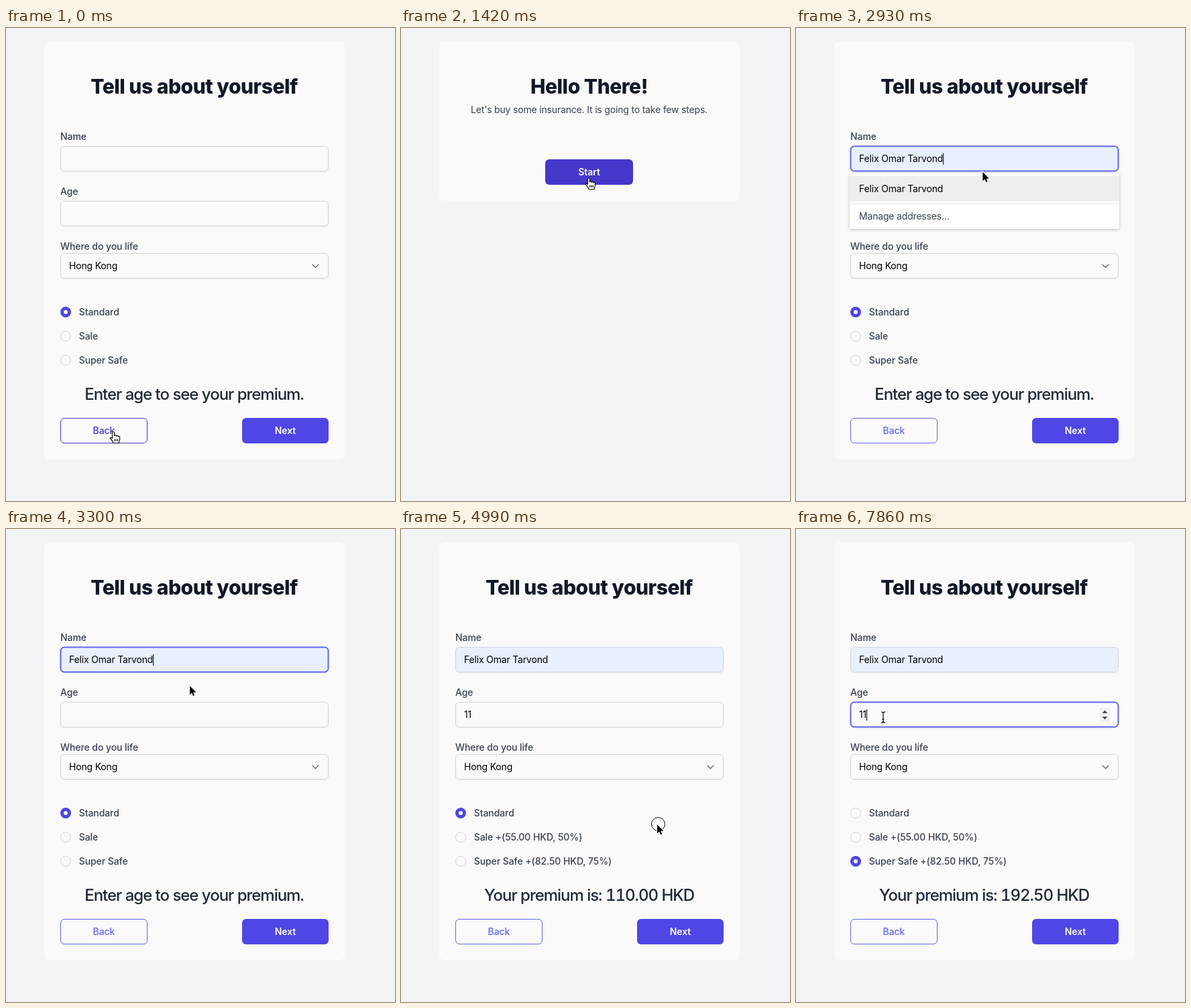
An HTML page that plays this animation: 580x706 px, repeating every 8 s.

```html
<!DOCTYPE html>
<html lang="en">
<head>
<meta charset="utf-8">
<title>Insurance form</title>
<style>
html, body { margin: 0; width: 100%; height: 100%; overflow: hidden; background: #f3f4f6; }
svg { display: block; width: 580px; height: 706px; }
text { font: 500 14px Inter, sans-serif; font-optical-sizing: none; letter-spacing: -.07px; fill: #374151; white-space: pre; }
.title { font-size: 30px; font-weight: 800; letter-spacing: -.47px; fill: #111827; }
.big { font-size: 24px; letter-spacing: -1.03px; font-variant-numeric: tabular-nums; fill: #1f2937; }
.mid { text-anchor: middle; }
.val, .note { font-weight: 400; letter-spacing: -.18px; }
.val { fill: #000; }
.solid { font-weight: 600; fill: #fff; }
.card { x: 57px; y: 20px; width: 448px; rx: 8px; fill: #fafafa; }
.field { x: 81.5px; width: 399px; height: 37px; rx: 5.5px; fill: #fafafa; stroke: #d1d5db; filter: drop-shadow(0 1px 1px rgba(0,0,0,.06)); }
.field.filled { fill: #e8f0fe; }
.field.focus { stroke: #6366f1; stroke-width: 2px; }
.caret { width: 1px; height: 17px; }
.primary { height: 38px; rx: 6px; fill: #4f46e5; }
.primary.hover { fill: #4338ca; }
#back { fill: #6366f1; }
#back.hover { fill: #4338ca; }
#back rect { fill: none; stroke: #6366f1; }
#back.hover rect { stroke: #4338ca; }
#back text { fill: inherit; }
.ring { fill: none; stroke: #6366f1; stroke-width: 2px; }
#menu { filter: drop-shadow(0 1px 2px rgba(0,0,0,.25)); }
</style>
</head>
<body>
<svg viewBox="0 0 580 706">
  <g id="hello">
    <rect class="card" height="238"/>
    <text class="title mid" x="280.5" y="97.5">Hello There!</text>
    <text class="note mid" x="280.5" y="127">Let's buy some insurance. It is going to take few steps.</text>
    <rect id="start" class="primary" x="215" y="196" width="131"/>
    <text class="solid mid" x="280.5" y="220">Start</text>
  </g>
  <g id="form">
    <rect class="card" height="624"/>
    <text class="title mid" x="280.5" y="97.5">Tell us about yourself</text>

    <text x="81" y="167">Name</text>
    <rect id="nameBox" class="field" y="176.5"/>
    <text id="name" class="val" x="94" y="200"></text>
    <rect id="nameCaret" class="caret" y="187"/>

    <text x="81" y="249">Age</text>
    <rect id="ageBox" class="field" y="258.5"/>
    <text id="age" class="val" x="94" y="282"></text>
    <rect id="ageCaret" class="caret" y="269"/>
    <g id="spinner" transform="translate(460.5 277.5)">
      <rect x="-7.5" y="-10.5" width="15" height="21" fill="#f1f1f1"/>
      <path d="M-4 -2.5 L0 -7 L4 -2.5 Z M-4 2.5 L0 7 L4 2.5 Z" fill="#4b4b4b"/>
    </g>

    <text x="81" y="331">Where do you life</text>
    <rect class="field" y="336.5"/>
    <text class="val" x="94" y="360">Hong Kong</text>
    <path d="M457 353 l4.5 4.5 l4.5 -4.5" fill="none" stroke="#6b7280" stroke-width="1.4" stroke-linecap="round"/>

    <g id="radios"></g>
    <text id="premium" class="big mid" x="280.5" y="555"></text>
    <g id="back">
      <rect x="81.5" y="582.5" width="129" height="37" rx="5.5"/>
      <text class="mid" x="146" y="606">Back</text>
    </g>
    <rect id="backRing" class="ring" x="78" y="579" width="136" height="44" rx="9"/>
    <rect class="primary" x="352" y="582" width="129"/>
    <text class="solid mid" x="416.5" y="606">Next</text>

    <g id="menu">
      <rect x="80" y="217" width="402" height="83" rx="3" fill="#fff"/>
      <rect id="menuRow" x="80" y="221" width="402" height="38" fill="#eee"/>
      <text id="menuName" class="val" x="94" y="245"></text>
      <path d="M80 262.5 H482" stroke="#e5e7eb"/>
      <text class="note" x="94" y="286">Manage addresses…</text>
    </g>
  </g>
  <g id="cursor">
    <circle id="press" cx="1.5" cy="-.5" r="10" fill="none" stroke="#000"/>
    <path id="arrow" d="M0 0 V13.5 L3 10.6 L5 15.2 L7.2 14.2 L5.2 9.8 H9.4 Z" stroke="#fff" stroke-width="1.8" paint-order="stroke"/>
    <g id="beam" fill="none">
      <path id="bar" d="M-3 -8 Q0 -8 0 -6 V6 Q0 8 -3 8 M3 -8 Q0 -8 0 -6 M0 6 Q0 8 3 8 M-1.6 3 H1.6"/>
      <use href="#bar" stroke="#fff" stroke-width="2.4"/>
      <use href="#bar" stroke="#000" stroke-width="1.2"/>
    </g>
    <g id="hand" stroke="#000" stroke-width="1.1" stroke-linejoin="round">
      <path fill="#fff" d="M-1.5 9.5 V1 a1.5 1.5 0 0 1 3 0 V6 a1.5 1.5 0 0 1 3 .4 a1.4 1.4 0 0 1 2.8 .6 a1.2 1.2 0 0 1 2.3 1 V11.5 Q8.3 14 8.3 16.5 H0 Q-.3 14 -4.7 9.5 Q-4.5 6.5 -1.5 9.5 Z"/>
      <path d="M1.8 10.4 v3.4 m2.3 0 v-3.4 m2.3 0 v3.4"/>
    </g>
  </g>
</svg>
<script>
const LOOP = 8000;
const NAME = 'Felix Omar Tarvond';
const RATE = 10;
const plans = [['Standard', 0], ['Sale', 50], ['Super Safe', 75]];

const when = {
  pressBack: 180, hello: 260, form: 1990,
  focusName: 2630, menu: 2690, preview: 2930, pick: 3200,
  focusAge: 3780, one: 4100, eleven: 4340, blur: 4990,
  sale: 5960, superSafe: 6820, refocus: 7800
};

// each move starts where the last one ended; bend bows it sideways
const home = { x: 160, y: 603 };
const moves = [
  { from: 470, to: 610, x: 347, y: 214, bend: .62 },
  { from: 780, to: 1460, x: 280, y: 226, bend: 3.9 },
  { from: 2220, to: 2360, x: 280, y: 208 },
  { from: 2870, to: 3300, x: 274, y: 234 },
  { from: 3360, to: 3540, x: 278, y: 277 },
  { from: 4430, to: 4810, x: 382, y: 441 },
  { from: 5060, to: 5550, x: 86, y: 457 },
  { from: 6000, to: 6340, x: 86, y: 490 },
  { from: 6880, to: 7570, x: 130, y: 281 }
];

const $ = id => document.getElementById(id);
const show = (el, on) => { el.style.display = on ? '' : 'none'; };
const mark = (id, cls, on) => $(id).classList.toggle(cls, on);
const put = (el, text) => { if (el.textContent !== text) el.textContent = text; };
const within = (t, a, b) => t >= a && t < b;
const easeOut = k => 1 - (1 - k) ** 2;

function pointer(t) {
  let { x, y } = home;
  for (const m of moves) {
    if (t < m.from) break;
    const k = easeOut(Math.min(1, (t - m.from) / (m.to - m.from)));
    const dx = m.x - x, dy = m.y - y;
    const bow = 2 * k * (1 - k) * (m.bend || 0);
    x += dx * k - dy * bow;
    y += dy * k + dx * bow;
  }
  return [x, y];
}

function add(tag, attrs) {
  const el = document.createElementNS('http://www.w3.org/2000/svg', tag);
  for (const key in attrs) el.setAttribute(key, attrs[key]);
  return $('radios').appendChild(el);
}

const radios = plans.map((_, i) => {
  const cx = 89, cy = 424 + 36 * i;
  return {
    ring: add('circle', { class: 'ring', cx, cy, r: 11 }),
    off: add('circle', { cx, cy, r: 7.5, fill: '#fafafa', stroke: '#d1d5db' }),
    on: add('circle', { cx, cy, r: 5.5, fill: '#fff', stroke: '#4f46e5', 'stroke-width': 5 }),
    label: add('text', { x: 108.7, y: cy + 5 })
  };
});
put($('menuName'), NAME);

function drawPlans(age, chosen, ringed) {
  const base = age * RATE;
  plans.forEach(([title, pct], i) => {
    const r = radios[i];
    const extra = age && pct ? ` +(${(base * pct / 100).toFixed(2)} HKD, ${pct}%)` : '';
    put(r.label, title + extra);
    show(r.ring, ringed && i === chosen);
    show(r.on, i === chosen);
    show(r.off, i !== chosen);
  });
  const total = base * (1 + plans[chosen][1] / 100);
  put($('premium'), age ? `Your premium is: ${total.toFixed(2)} HKD` : 'Enter age to see your premium.');
}

function drawField(id, value, focus) {
  put($(id), value);
  mark(id + 'Box', 'focus', focus);
  show($(id + 'Caret'), focus);
  if (focus) $(id + 'Caret').setAttribute('x', 94 + (value ? $(id).getComputedTextLength() : 0));
}

function draw(t) {
  const [x, y] = pointer(t);
  const over = (l, top, w, h) => within(x, l, l + w) && within(y, top, top + h);
  const hello = within(t, when.hello, when.form);
  const menu = within(t, when.menu, when.pick);
  const filled = t >= when.preview;
  const age = t < when.one ? 0 : t < when.eleven ? 1 : 11;
  const ageFocus = within(t, when.focusAge, when.blur) || t >= when.refocus;
  const chosen = t < when.sale ? 0 : t < when.superSafe ? 1 : 2;

  const overStart = hello && over(215, 196, 131, 38);
  const overBack = !hello && over(81, 582, 130, 38);
  const overName = !hello && over(81, 176, 400, 38);
  const overAge = !hello && !menu && over(81, 258, 400, 38);
  const overText = hello && (over(192, 70, 176, 35) || over(104, 113, 353, 18));

  show($('hello'), hello);
  show($('form'), !hello);
  mark('start', 'hover', overStart);
  mark('back', 'hover', overBack);
  show($('backRing'), within(t, when.pressBack, when.hello));
  drawField('name', filled ? NAME : '', within(t, when.focusName, when.focusAge));
  mark('nameBox', 'filled', filled);
  drawField('age', age ? String(age) : '', ageFocus);
  show($('spinner'), ageFocus || overAge);
  show($('menu'), menu);
  show($('menuRow'), filled);
  drawPlans(age, chosen, within(t, when.sale, when.refocus));

  const shape = overStart || overBack ? 'hand' : overName || overAge || overText ? 'beam' : 'arrow';
  for (const id of ['hand', 'beam', 'arrow']) show($(id), id === shape);
  show($('press'), within(t, when.blur, when.blur + 60));
  // typing hides the pointer until it moves again
  show($('cursor'), !within(t, when.one, moves[5].from));
  $('cursor').setAttribute('transform', `translate(${x.toFixed(1)} ${y.toFixed(1)})`);
}

function tick() {
  draw(performance.now() % LOOP);
  requestAnimationFrame(tick);
}
tick();
</script>
</body>
</html>
```
